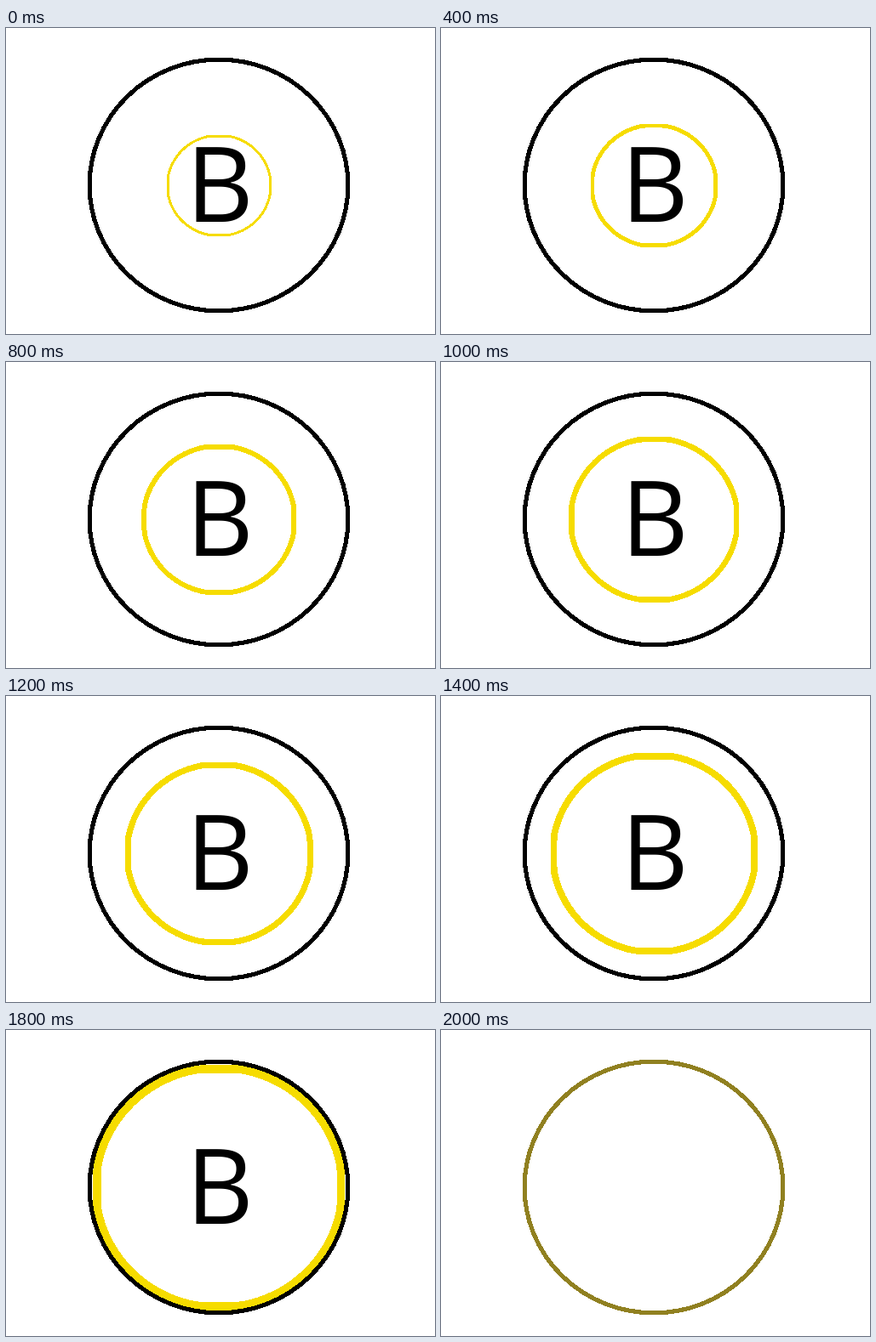
Write an HTML page that moves like this. It is 504x360 px and loops after 2.5 s.

```html
<!DOCTYPE html>
<html lang="en">
<head>
<meta charset="utf-8">
<title>Pulse</title>
<style>
  html, body { margin: 0; width: 100%; height: 100%; overflow: hidden; background: #fff; }
  svg { display: block; width: 504px; height: 360px; }
  .ring { fill: none; shape-rendering: crispEdges; }
  text { font: 122.4px "Open Sans", "Noto Sans", sans-serif; }
</style>
</head>
<body>
<svg viewBox="0 0 504 360">
  <path id="pulse" class="ring" stroke="#f6dc00"/>
  <ellipse id="rim" class="ring" cx="250" cy="185" rx="151.9" ry="147.9" stroke-width="5.2"/>
  <text id="letter" x="211.6" y="228.3">B</text>
</svg>
<script>
const LOOP = 2500, STEP = 100, GROWTH = 1.05, LAST_PULSE = 18;
const CENTER = { x: 250.3, y: 185.4 };
const BULGE = 1.014, POINTS = 96;
const pulse = document.getElementById("pulse");
const rim = document.getElementById("rim");
const letter = document.getElementById("letter");

function clamp(value, limit) {
  return Math.max(-limit, Math.min(limit, value));
}

// Ellipse flattened on its four sides by a box with half sizes rx, ry.
function ringPath(rx, ry) {
  const points = Array.from({ length: POINTS }, (_, i) => {
    const a = i * 2 * Math.PI / POINTS;
    const x = CENTER.x + clamp(rx * BULGE * Math.cos(a), rx);
    const y = CENTER.y + clamp(ry * BULGE * Math.sin(a), ry);
    return x.toFixed(2) + " " + y.toFixed(2);
  });
  return "M" + points.join("L") + "Z";
}

function show(visible) {
  return visible ? "inline" : "none";
}

function render(time) {
  const step = Math.min(20, Math.floor((time % LOOP) / STEP));
  const pulsing = step <= LAST_PULSE;
  pulse.style.display = show(pulsing);
  letter.style.display = show(step < 20);
  rim.setAttribute("stroke", pulsing ? "#000" : "#908020");
  if (!pulsing) return;

  const scale = GROWTH ** step;
  const width = step === 0 ? 3 : 4 * scale;
  pulse.setAttribute("stroke-width", width);
  pulse.setAttribute("d", ringPath(61.5 * scale - width / 2, 59.9 * scale - width / 2));
}

let start;
function tick(now) {
  start ??= now;
  render(now - start);
  requestAnimationFrame(tick);
}
render(0);
requestAnimationFrame(tick);
</script>
</body>
</html>
```
